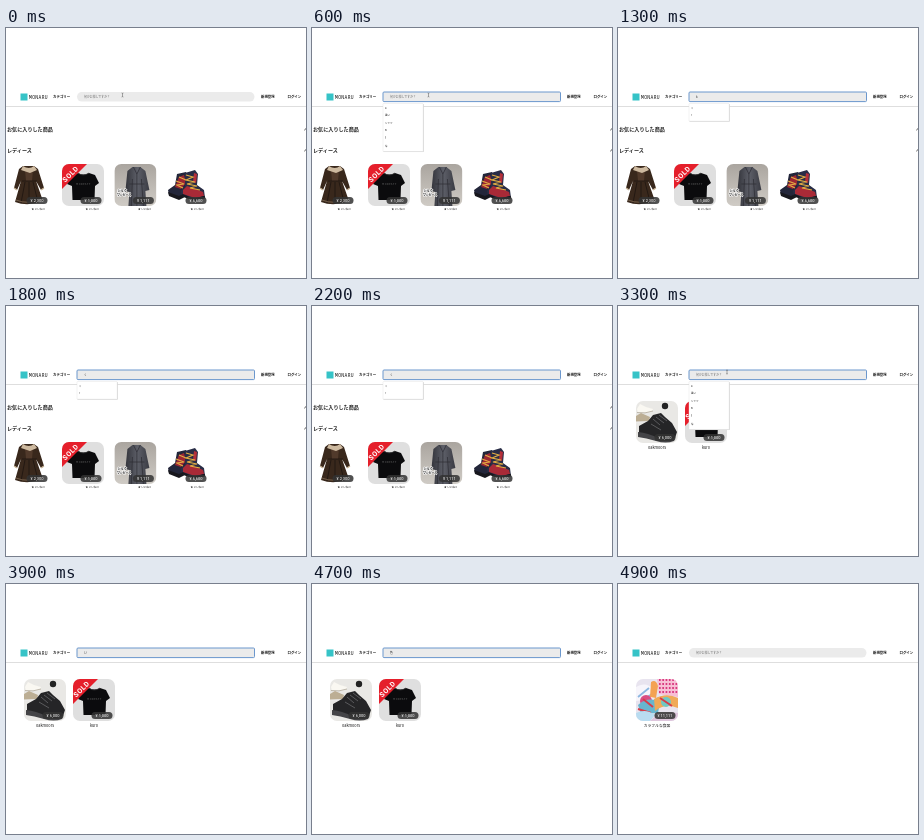
These frames come from a looping animation (300x250 px, 5000 ms). An HTML page:

```html
<!DOCTYPE html>
<html lang="ja">
<head>
<meta charset="utf-8">
<title>Search demo</title>
<style>
html, body { margin: 0; width: 100%; height: 100%; overflow: hidden; background: #fff; }
svg { display: block; width: 100vw; height: 100vh; }
text { font-family: "Noto Sans CJK JP", "Noto Sans CJK", "Noto Sans", sans-serif; fill: #111; }
.b { font-weight: 700; }
.price { font-size: 4px; fill: #fff; text-anchor: middle; font-family: Roboto, sans-serif; }
.label { font-size: 3.8px; text-anchor: middle; font-weight: 500; }
.like { font-size: 2.6px; font-weight: 500; }
.head { font-size: 5.1px; font-weight: 700; fill: #222; }
.brand { font-family: "Noto Sans Mono", monospace; font-size: 4.7px; letter-spacing: .35px; font-weight: 500; }
.row { font-size: 2.5px; font-weight: 500; }
</style>
</head>
<body>
<svg viewBox="0 0 300 250">
  <defs>
    <clipPath id="round"><rect width="42" height="42" rx="7"/></clipPath>
    <linearGradient id="wall" x2="0" y2="1"><stop stop-color="#aaa59f"/><stop offset="1" stop-color="#cfcbc5"/></linearGradient>
    <linearGradient id="grey"><stop stop-color="#33343b"/><stop offset=".5" stop-color="#5d5f68"/><stop offset="1" stop-color="#3a3b43"/></linearGradient>

    <g id="brown">
      <path d="M15 2 L11 5 6 24 9 26 13 17 7 38 Q20 43 35 37 L28 17 33 26 36 24 30 5 26 2Z" fill="#39281c"/>
      <path d="M17 6 H25 L24 17 H18Z" fill="#513a2b"/>
      <path d="M15 2 Q21 6 26 2 L29 6 22 9 13 6Z" fill="#cdb99f"/>
      <path d="M14 17 H29 M17 18 L13 39 M21 18 V40 M25 18 L30 38" stroke="#231812" fill="none"/>
      <path d="M6 24 L9 26 M33 26 L36 24" stroke="#c9b597" stroke-width="1.4"/>
      <path d="M8 36 Q20 41 34 35" stroke="#8d765e" stroke-width=".7" fill="none"/>
    </g>

    <g id="tee">
      <rect width="42" height="42" fill="#dfdfdf"/>
      <path d="M16 9 Q21 12 27 9 L33 11 37 19 33 22 32.5 36 H10.5 L10 22 5 20 9 12Z" fill="#0b0b0d"/>
      <path d="M16 9 Q21 13 27 9" fill="none" stroke="#333" stroke-width=".7"/>
      <text x="21.5" y="20.5" font-size="2.3" text-anchor="middle" letter-spacing=".6" style="fill:#777">MODESTY</text>
      <path d="M0 0 H25 L0 25Z" fill="#e51f2b"/>
      <text transform="translate(3.2 18.8) rotate(-45)" class="b" font-size="7" letter-spacing=".6" style="fill:#fff;font-family:Roboto,sans-serif">SOLD</text>
    </g>

    <g id="silk">
      <rect width="42" height="42" fill="url(#wall)"/>
      <path d="M18 3 L13 7 11 27 15 28 14 42 H32 L31 27 35 26 31 7 26 3Z" fill="url(#grey)"/>
      <path d="M19 3 L22.5 10 26 3 M22.5 10 V42 M18 15 L17 42 M27 15 L29 42 M15 20 H30" stroke="#2b2c33" stroke-width=".7" fill="none"/>
      <g class="b" stroke="#fff" stroke-width="1.2" paint-order="stroke">
        <text x="3" y="27.6" font-size="3.2">シルク</text><text x="2.5" y="32" font-size="2.9">ワンピース</text>
      </g>
    </g>

    <g id="boots">
      <path d="M10 10 L19 8 22 14 20 30 13 34 2 31 1 26 8 21Z" fill="#23263a"/>
      <path d="M12 13 L17 11 19 19 14 25 8 23Z" fill="#9d2733"/>
      <path d="M1 28 L12 32 20 28 V32 L12 36 2 32Z" fill="#17171d"/>
      <path d="M18 9 L28 6 31 10 30 21 37 26 38 34 28 37 15 32 14 27 18 23Z" fill="#292d46"/>
      <path d="M16 26 L20 22 29 25 36 28 37 32 28 34 16 30Z" fill="#a92a37"/>
      <path d="M27 9 L30 10 29 19 26 18Z" fill="#b52e3a"/>
      <path d="M9 17 L17 20 10 21 16 24 M12 13 L19 16 M19 11 L26 13 19 16 28 18 20 20 30 22 23 24 33 26" stroke="#e3ad42" stroke-width="1.2" fill="none"/>
      <path d="M15 31 L27 36 38 33" stroke="#17171d" stroke-width="2.4" fill="none"/>
    </g>

    <g id="sneaker">
      <rect width="42" height="42" fill="#e9e8e5"/>
      <path d="M1 8 L4 3 10 6 17 8 16 11 2 12Z" fill="#faf8f2"/>
      <path d="M1 11.5 Q9 13 17 10" stroke="#bdb7ab" fill="none"/>
      <path d="M0 15 L5 12 14 16 13 20 0 21Z" fill="#bcae94"/>
      <path d="M0 21 H13" stroke="#eee" stroke-width="1.2"/>
      <circle cx="29" cy="5" r="3.2" fill="#222"/>
      <path d="M3 25 L12 20 17 14 25 12 29 16 36 22 41 31 39 37 31 40 15 35 3 33Z" fill="#252527"/>
      <path d="M2 31 Q12 32 22 37 T39 36 L38 40 Q30 43 20 40 T2 36Z" fill="#444447"/>
      <path d="M17 18 L24 24 M20 16 L28 22 M23 14 L31 20 M15 23 L25 29" stroke="#67676a" stroke-width=".8"/>
    </g>

    <g id="bright">
      <rect width="42" height="42" fill="#e8e4ef"/>
      <path d="M21 0 H42 V18 L23 15Z" fill="#f7bfd5"/>
      <path d="M23 1 H42 M23 5 H42 M23 9 H42 M23 13 H42" stroke="#d93980" stroke-width="2.2" stroke-dasharray="1.7 1.6"/>
      <path d="M0 8 Q9 2 18 10 L19 19 0 22Z" fill="#f7f5fb"/>
      <path d="M2 18 L13 9 M6 21 L18 14" stroke="#8bb7e0" stroke-width="1.8"/>
      <path d="M15 3 Q20 0 22 7 L20 19 14 18Z" fill="#f4a253"/>
      <circle cx="10" cy="22" r="6" fill="#d84d83"/>
      <path d="M2 26 Q12 17 24 23 L22 34 5 35Z" fill="#68b6cf"/>
      <path d="M18 20 Q30 13 42 19 V29 Q29 24 19 32Z" fill="#f0aa58"/>
      <circle cx="30" cy="23" r="5" fill="#70c8c3"/>
      <path d="M7 20 L17 28 M2 30 L15 34 M24 19 L36 27" stroke="#d73d49" stroke-width="2"/>
      <path d="M0 34 Q10 29 19 36 L14 42 H0Z" fill="#b9dcf0"/>
      <path d="M14 42 Q24 31 42 34 V42Z" fill="#dec5dc"/>
    </g>
  </defs>

  <rect width="300" height="250" fill="#fff"/>
  <rect y="78" width="300" height="1" fill="#dedede"/>
  <g id="home" class="page">
    <text class="head" x="1" y="103">お気に入りした商品</text>
    <text class="head" x="1" y="124">レディース</text>
    <path d="M298.3 102.2 L299.8 100.8 301 102.2 M298.3 123.2 L299.8 121.8 301 123.2" fill="none" stroke="#222" stroke-width=".8"/>
  </g>
  <g id="black" class="page"></g>
  <g id="color" class="page"></g>

  <g id="header">
    <rect x="14.5" y="65.5" width="7" height="7" fill="#36c3c7"/>
    <text x="23" y="70.9" class="brand">MONARU</text>
    <text x="47" y="70.3" font-size="3.45" class="b">カテゴリー</text>
    <rect id="field" x="71" y="64" width="177.5" height="9.6" fill="#ebebeb"/>
    <text id="query" x="78" y="70" font-size="2.9"></text>
    <text x="255" y="70.3" font-size="3.4" class="b">新規登録</text>
    <text x="281.5" y="70.3" font-size="3.4" class="b">ログイン</text>
  </g>
  <g id="menu"></g>
  <path id="beam" d="M-.9 -2 Q0 -2 0 -1.4 Q0 -2 .9 -2 M0 -1.4 V1.4 M-.9 2 Q0 2 0 1.4 Q0 2 .9 2" fill="none" stroke="#555" stroke-width=".5"/>
</svg>
<script>
const $ = id => document.getElementById(id);
const LOOP = 5000;
const HINT = '何かお探しですか？';
const ALL = ['a', '黒い', 'シャツ', 'B', 'f', 'な'];
const SHORT = ['く', 'ｲ'];

// start, page, focused, query, suggestions, pointer
const steps = [
  [0,    'home',  0, '', [], [116.5, 67]],
  [400,  'home',  1, '', [], [116.5, 67]],
  [500,  'home',  1, '', ALL, [116.5, 67]],
  [900,  'home',  1, 'k', SHORT, null],
  [1400, 'home',  1, 'く', SHORT, null],
  [2300, '',      0, '', [], null],
  [2400, 'black', 0, '', [], null],
  [2800, 'black', 0, '', [], [109, 66]],
  [3000, 'black', 1, '', ALL, [109, 66]],
  [3700, 'black', 1, 'い', [], null],
  [4000, 'black', 1, 'いろ', [], null],
  [4400, 'black', 1, '色', [], null],
  [4800, '',      0, '', [], null],
  [4900, 'color', 0, '', [], null]
];

function card(page, x, y, art, price, name) {
  const foot = name
    ? `<text class="label" x="21" y="48.2">${name}</text>`
    : '<text class="like" x="23.6" y="45.7">★ いいね 0</text>';
  $(page).insertAdjacentHTML('beforeend', `<g transform="translate(${x} ${y})">
    <g clip-path="url(#round)"><use href="#${art}"/></g>
    <rect x="18.5" y="33" width="21" height="7" rx="3.5" fill="#333" fill-opacity=".85"/>
    <text class="price" x="29" y="38">¥ ${price}</text>${foot}</g>`);
}

card('home', 2, 136, 'brown', '2,300');
card('home', 56, 136, 'tee', '1,000');
card('home', 108.4, 136, 'silk', '1,111');
card('home', 161, 136, 'boots', '6,600');
card('black', 18, 95, 'sneaker', '6,000', 'oakmoors');
card('black', 67, 95, 'tee', '1,000', 'kuro');
card('color', 18, 95, 'bright', '11,111', 'カラフルな食器');

function drawMenu(items) {
  if (!items.length) return '';
  const h = 2.5 + items.length * 7.6;
  const rows = items.map((s, i) =>
    `<text class="row" x="73" y="${80.5 + i * 7.6}">${s}</text>`);
  return `<rect x="71.3" y="76" width="40.5" height="${h}" rx=".8" fill="#ccc"/>
    <rect x="71" y="75.5" width="40.2" height="${h}" rx=".6" fill="#fff" stroke="#ddd" stroke-width=".4"/>` + rows.join('');
}

let shown = null;
function show(step) {
  if (step === shown) return;
  shown = step;
  const [, page, focus, query, items, pointer] = step;
  document.querySelectorAll('.page').forEach(p => p.style.display = p.id === page ? '' : 'none');
  $('header').style.display = page ? '' : 'none';
  const field = $('field');
  field.setAttribute('rx', focus ? 1 : 4.8);
  field.setAttribute('stroke', focus ? '#6b97cd' : 'none');
  $('query').textContent = query || HINT;
  $('query').style.fill = query ? '#222' : '#666';
  $('menu').innerHTML = drawMenu(items);
  $('beam').style.display = pointer ? '' : 'none';
  if (pointer) $('beam').setAttribute('transform', `translate(${pointer})`);
}

function tick() {
  const t = performance.now() % LOOP;
  show(steps.findLast(s => s[0] <= t));
  requestAnimationFrame(tick);
}
tick();
</script>
</body>
</html>
```
